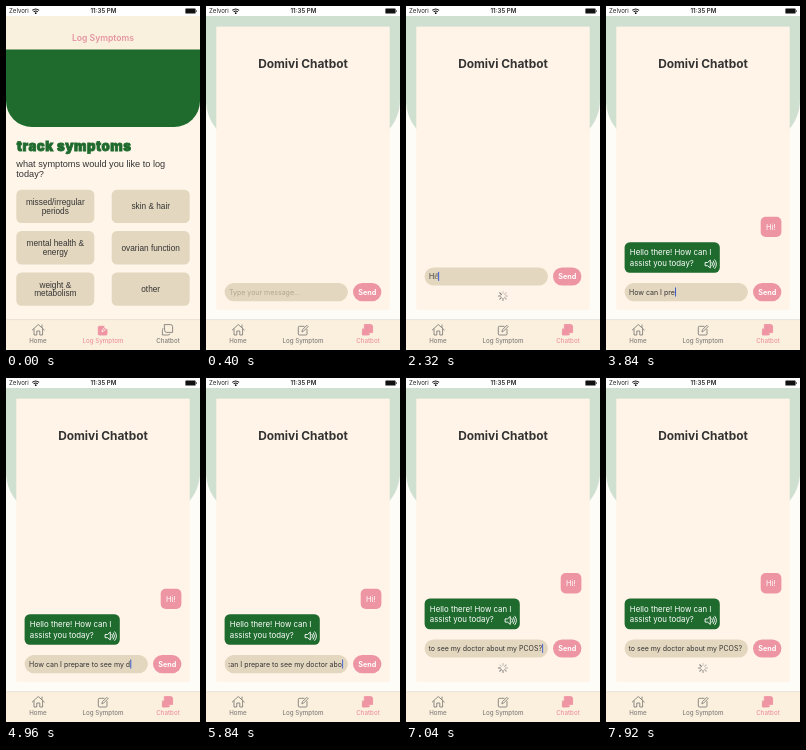
An HTML page for the animation above (8 s loop, 194 by 344 pixels).

```html
<!DOCTYPE html>
<html lang="en">
<head>
<meta charset="utf-8">
<title>Symptom tracker</title>
<style>
  html, body { margin: 0; width: 100%; height: 100%; overflow: hidden; }
  svg { display: block; }
  text { font-family: Inter, sans-serif; white-space: pre; }
  .mid { text-anchor: middle; }
  .arial { font-family: "Liberation Sans", Arial, sans-serif; fill: #333; }
  .bold { font-weight: 700; }
  .tan { fill: #e4d7bf; }
  .pink { fill: #ee95a3; }
  .green { fill: #1f6b2e; }
  .tab { color: #827f7c; font-size: 6.2px; font-weight: 500; }
  .tab text { fill: currentColor; }
  .tab path { fill: none; stroke: currentColor; stroke-width: .9; stroke-linejoin: round; stroke-linecap: round; }
  .tab.on { color: #ee95a3; }
  .tab.on .solid { fill: currentColor; }
  .tab.on .nib { stroke: #fff5ea; }
</style>
</head>
<body>
<svg id="stage" width="100%" height="100%" viewBox="0 0 194 344">
  <g id="logPage">
    <rect width="194" height="344" fill="#fff5e9"/>
    <rect y="10" width="194" height="34" fill="#faf0de"/>
    <text class="mid" x="97" y="35" font-size="8.6" font-weight="600" fill="#e495a2">Log Symptoms</text>
    <path class="green" d="M0 43.5H194V95A26 26 0 0 1 168 121H26A26 26 0 0 1 0 95Z"/>
    <text x="10.8" y="145" font-size="13.2" font-weight="900" letter-spacing=".5" fill="#1f6b2e" stroke="#1f6b2e" stroke-width=".8">track symptoms</text>
    <g font-size="9.18">
      <text class="arial" x="10.3" y="161">what symptoms would you like to log</text>
      <text class="arial" x="10.3" y="171.2">today?</text>
    </g>
    <g id="choices" font-size="8.27"></g>
  </g>

  <g id="chatPage">
    <rect width="194" height="344" fill="#fefcf7"/>
    <path fill="#cfe0d1" d="M0 10H194V94A45 45 0 0 1 149 139H45A45 45 0 0 1 0 94Z"/>
    <rect x="10.3" y="20.7" width="173.4" height="283" fill="#fff4e7"/>
    <text class="mid bold" x="97" y="62" font-size="11.9" fill="#333">Domivi Chatbot</text>
    <g id="dock">
      <g id="messages">
        <rect class="pink" x="154.7" y="210.7" width="20.7" height="20.3" rx="5"/>
        <text x="160" y="223.7" font-size="7.7" fill="#fff">Hi!</text>
        <rect class="green" x="18.6" y="236.2" width="95.2" height="30.6" rx="5.2"/>
        <g font-size="7.85" fill="#fff">
          <text x="23.8" y="249.2">Hello there! How can I</text>
          <text x="23.8" y="259.6">assist you today?</text>
        </g>
        <path fill="none" stroke="#fff" stroke-width=".9" stroke-linejoin="round" stroke-linecap="round"
          d="M99.5 256.5H101.5L104.3 254V262L101.5 259.7H99.5ZM106 256.3q1.3 1.8 0 3.6M107.4 255q2.4 3.1 0 6.2M108.8 253.8q3.4 4.3 0 8.6"/>
      </g>
      <rect class="tan" x="18.6" y="277" width="123.3" height="18.2" rx="9.1"/>
      <svg x="22.5" y="277" width="115" height="18" overflow="hidden">
        <text id="field" y="11.5" font-size="7"></text>
        <rect id="caret" y="4.5" width="1" height="9" fill="#3a5bd0"/>
      </svg>
      <rect class="pink" x="147" y="277" width="28.4" height="18.2" rx="9.1"/>
      <text class="mid bold" x="161.2" y="288.6" font-size="7.2" fill="#fff">Send</text>
    </g>
    <g id="spinner" transform="translate(97 290)" stroke="#777" stroke-width="1.2" stroke-linecap="round"></g>
  </g>

  <g>
    <rect y="314" width="194" height="30" fill="#fbf0dd"/>
    <rect y="313.5" width="194" height=".6" fill="#d8d2c6"/>
    <g class="tab">
      <path d="M26.3 324L32.3 318.5L38.3 324M28 323V329H30.8V325H33.8V329H36.6V323M36 319V321.5"/>
      <text class="mid" x="32" y="337">Home</text>
    </g>
    <g class="tab" id="logTab">
      <path class="solid" d="M98 320.3H93.3Q92.3 320.3 92.3 321.3V328Q92.3 329 93.3 329H100Q101 329 101 328V323.5"/>
      <path class="nib" d="M96 325.5L96.4 323.8L100.8 319.3L102.1 320.6L97.7 325Z"/>
      <text class="mid" x="97" y="337">Log Symptom</text>
    </g>
    <g class="tab" id="chatTab">
      <path class="solid" d="M158.6 318.6H164.6Q166.6 318.6 166.6 320.6V326.4H160.6Q158.6 326.4 158.6 324.4Z"/>
      <path class="solid" d="M156.9 322.5Q156.4 323.6 156.4 324.6V329H161.6Q163.4 329 164 328.1"/>
      <text class="mid" x="162" y="337">Chatbot</text>
    </g>
  </g>

  <g>
    <rect width="194" height="10" fill="#fff"/>
    <text x="3" y="7.3" font-size="6.1" fill="#222">Zelvori</text>
    <path fill="none" stroke="#111" stroke-width="1.1" d="M26.3 4.4Q29.7 1.5 33.1 4.4M27.6 5.9Q29.7 4.1 31.8 5.9"/>
    <circle cx="29.7" cy="7.2" r=".9" fill="#111"/>
    <text class="mid" x="97.4" y="7.4" font-size="6.1" font-weight="600" fill="#222">11:35 PM</text>
    <rect x="179.4" y="2.4" width="10.2" height="5.2" rx=".7" fill="#111"/>
    <rect x="190" y="4.2" width=".8" height="1.7" rx=".4" fill="#111"/>
  </g>
</svg>

<script>
const LOOP = 8000, OPEN_CHAT = 160, FOCUS = 760;
const SEND_FIRST = 1840, REPLY = 2800, SEND_SECOND = 6880;
const QUESTION = "How can I prepare to see my doctor about my PCOS?";
// [characters typed, time]
const greetKeys = [[1, 1040], [2, 1200], [3, 1400]];
const questionKeys = [[1, 3200], [5, 3440], [13, 3820], [33, 5180], [38, 5820], [48, 6540], [49, 6640]];

const $ = id => document.getElementById(id);
const show = (id, on) => $(id).style.display = on ? "" : "none";

const choices = ["missed/irregular|periods", "skin & hair", "mental health &|energy",
  "ovarian function", "weight &|metabolism", "other"];
$("choices").innerHTML = choices.map((label, i) => {
  const x = 10.3 + i % 2 * 95.4, y = 183.8 + (i >> 1) * 41.3;
  const lines = label.replace("&", "&amp;").split("|");
  return `<rect class="tan" x="${x}" y="${y}" width="78" height="33.3" rx="5.2"/>` +
    lines.map((line, n) => `<text class="arial mid" x="${x + 39}" y="${
      y + 19.5 + (n - (lines.length - 1) / 2) * 8.7}">${line}</text>`).join("");
}).join("");

$("spinner").innerHTML = Array.from({ length: 8 }, (_, i) =>
  `<path d="M0 -2.4V-4.5" transform="rotate(${i * 45})"/>`).join("");
const spokes = [...$("spinner").children];

function typedCount(keys, t) {
  if (t < keys[0][1]) return 0;
  for (let i = 1; i < keys.length; i++) {
    const [n0, t0] = keys[i - 1], [n1, t1] = keys[i];
    if (t < t1) return Math.floor(n0 + (n1 - n0) * (t - t0) / (t1 - t0));
  }
  return keys.at(-1)[0];
}

function drawField(t) {
  const first = t < REPLY, keys = first ? greetKeys : questionKeys;
  const typed = (first ? "Hi!" : QUESTION).slice(0, typedCount(keys, t));
  const field = $("field");
  field.textContent = typed || "Type your message...";
  field.setAttribute("fill", typed ? "#333" : "#b0a58f");
  const width = typed ? field.getComputedTextLength() : 0;
  const shift = Math.min(.5, 113.5 - width);
  field.setAttribute("x", shift);
  $("caret").setAttribute("x", shift + width + .2);
  const idle = t - keys.at(-1)[1];
  show("caret", t >= FOCUS && (idle < 0 || Math.floor(idle / 425) % 2 === 0));
}

function draw(t) {
  const chat = t >= OPEN_CHAT;
  const waiting = t >= SEND_FIRST && t < REPLY || t >= SEND_SECOND;
  show("logPage", !chat);
  show("chatPage", chat);
  $("logTab").classList.toggle("on", !chat);
  $("chatTab").classList.toggle("on", chat);
  if (!chat) return;
  show("messages", t >= REPLY);
  show("spinner", waiting);
  $("dock").setAttribute("transform", `translate(0 ${waiting ? -15.6 : 0})`);
  const head = Math.floor(t / 100);
  spokes.forEach((s, i) => s.style.opacity = 1 - ((head - i) % 8 + 8) % 8 * .1);
  drawField(t);
}

function tick() {
  draw(performance.now() % LOOP);
  requestAnimationFrame(tick);
}
tick();
</script>
</body>
</html>
```
